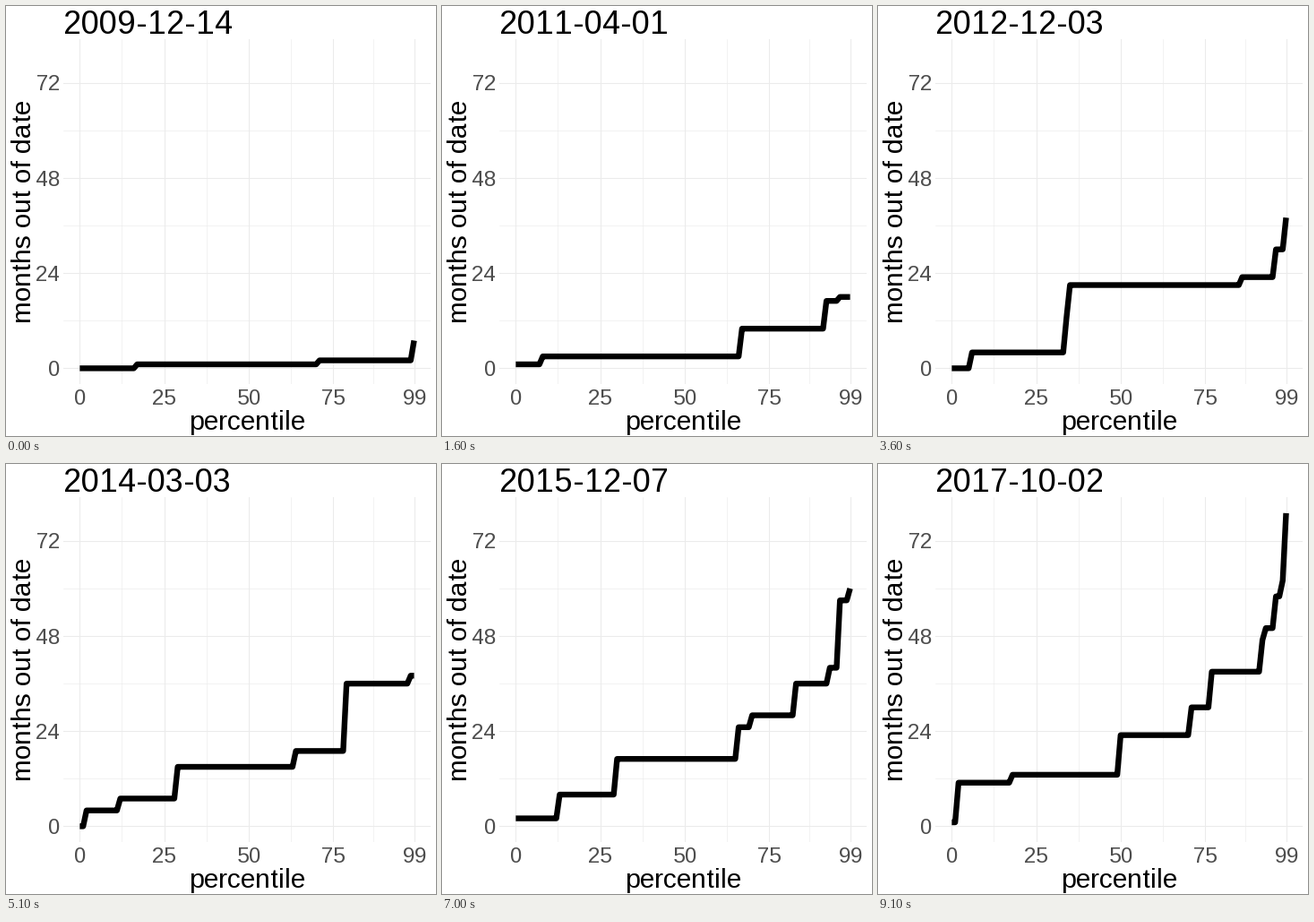
These frames come from a looping animation (480x480 px, 9200 ms). A matplotlib script:

```python
import numpy as np
import matplotlib.pyplot as plt
from matplotlib.animation import FuncAnimation

SIZE, DPI = 480, 72  # at 72 dpi one point is one pixel
LEFT, RIGHT, TOP, BOTTOM = 63.7, 474.2, 37.4, 421.9
GRID, TICK = "#ebebeb", "#4d4d4d"
START = -5.8  # log-odds of adoption on launch day

# Whole-pixel letter advances without kerning.
plt.rcParams.update({"font.family": "Liberation Sans",
                     "text.hinting_factor": 1, "text.kerning_factor": 6})


def survey_day(month):
    """The 1st of the month at first, later the first Monday."""
    first = month.astype("M8[D]")
    if month < np.datetime64("2012-12"):
        return first
    return np.busday_offset(first, 0, roll="forward", weekmask="Mon")


months = np.arange("2010-01", "2017-11", dtype="M8[M]")
skipped = np.array(["2014-10", "2015-07", "2016-10"], dtype="M8[M]")
surveys = [np.datetime64("2009-12-14")]
surveys += [survey_day(m) for m in months if m not in skipped]


def whole_months(start, end):
    first, last = start.astype("M8[M]"), end.astype("M8[M]")
    short = end - last.astype("M8[D]") < start - first.astype("M8[D]")
    return max((last - first).astype(int) - int(short), 0)


def root_age(launch, day):
    return np.sqrt(max((day - launch).astype(int), 0) / 30.4)


def log_odds(percent):
    share = np.clip(percent / 100, 0.0003, 0.99966)
    return np.log(share / (1 - share))


releases = []


def release(superseded, reach):
    """Add a release, launched when the one before it was superseded.

    reach maps a few survey numbers to the percentage of users on this
    release or a newer one; its log-odds grow with the root of its age.
    """
    launch = releases[-1][1] if releases else np.datetime64("2009-02-09")
    ages = [0] + [root_age(launch, surveys[i]) for i in reach]
    odds = [START] + [log_odds(percent) for percent in reach.values()]
    releases.append((launch, np.datetime64(superseded), ages, odds))


release("2009-04-27", {0: 100})
release("2009-09-15", {0: 99.7, 4: 100})
release("2009-10-26", {0: 71.5, 4: 61.8, 8: 84.7, 24: 99.2, 46: 100})
release("2010-01-12", {0: 17.1, 4: 30.3})
release("2010-05-20", {4: 29.5, 8: 64.4, 24: 97.9, 36: 99.6, 46: 100})
release("2010-12-06", {8: 4.7, 10: 33.7, 24: 88.3, 36: 96.9, 46: 100})
release("2011-02-22", {24: 53, 36: 86.6, 51: 98.8, 70: 99.8, 83: 100})
release("2011-07-15", {24: 2.3, 36: 35.8})
release("2011-10-19", {24: 1.2, 36: 35.4})
release("2012-07-09", {24: 0.6, 36: 34.2, 51: 79.8, 70: 96.8, 91: 99.4})
release("2012-11-13", {36: 6.7, 51: 64.5, 70: 93.5, 91: 98.8})
release("2013-07-24", {51: 29.2, 70: 83.2, 91: 96.2})
release("2013-10-31", {51: 12.1, 70: 70.2, 91: 93.1})
release("2014-06-25", {51: 2.5, 58: 30.2, 70: 66.5, 91: 92.1})
release("2015-03-09", {70: 30.1, 91: 77.2})
release("2015-10-05", {70: 13.2, 91: 71.3})
release("2016-08-22", {70: 0.5, 80: 24.3, 91: 50.2})
release("2016-10-04", {91: 18.2})
release("2017-08-05", {89: 0.9, 91: 2.2})


def months_behind(day):
    behind = np.zeros(100)
    for launch, superseded, ages, odds in releases:
        grown = np.interp(root_age(launch, day), ages, odds)
        count = int(100 / (1 + np.exp(-grown)) + 0.05)
        behind[:count] = whole_months(superseded, day)
    return behind


fig = plt.figure(figsize=(SIZE / DPI, SIZE / DPI), dpi=DPI, facecolor="white")
ax = fig.add_axes([LEFT / SIZE, 1 - BOTTOM / SIZE,
                   (RIGHT - LEFT) / SIZE, (BOTTOM - TOP) / SIZE])
ax.set(xlim=(-4.95, 103.95), ylim=(-3.95, 82.95))
ax.axis("off")


def label(x, y, text, size, color="black", **style):
    return fig.text(x / SIZE, 1 - y / SIZE, text, fontsize=size, color=color,
                    va="baseline", **style)


def to_pixels(x, y):
    px, py = ax.transData.transform((x, y))
    return px, SIZE - py


for x in (12.5, 37.5, 62.5, 87):
    ax.axvline(x, color=GRID, lw=0.6)
for y in (12, 36, 60):
    ax.axhline(y, color=GRID, lw=0.6)
for x in (0, 25, 50, 75, 99):
    ax.axvline(x, color=GRID, lw=1.07)
    label(to_pixels(x, 0)[0], 445, str(x), 24, TICK, ha="center")
for y in (0, 24, 48, 72):
    ax.axhline(y, color=GRID, lw=1.07)
    label(59.6, to_pixels(0, y)[1] + 8.5, str(y), 24, TICK, ha="right")

label((LEFT + RIGHT) / 2, 473, "percentile", 30, ha="center")
label(28, (TOP + BOTTOM) / 2, "months out of date", 30, ha="center",
      rotation=90, rotation_mode="anchor")
title = label(LEFT, 31, "", 36)
curve, = ax.plot([], [], color="black", lw=6.4, solid_capstyle="butt",
                 solid_joinstyle="round", clip_on=False, zorder=5)


def draw(index):
    day = surveys[index]
    title.set_text(str(day))
    curve.set_data(np.arange(100), months_behind(day))
    return title, curve


animation = FuncAnimation(fig, draw, frames=len(surveys), interval=100,
                          repeat=True, repeat_delay=0)
plt.show()
```
